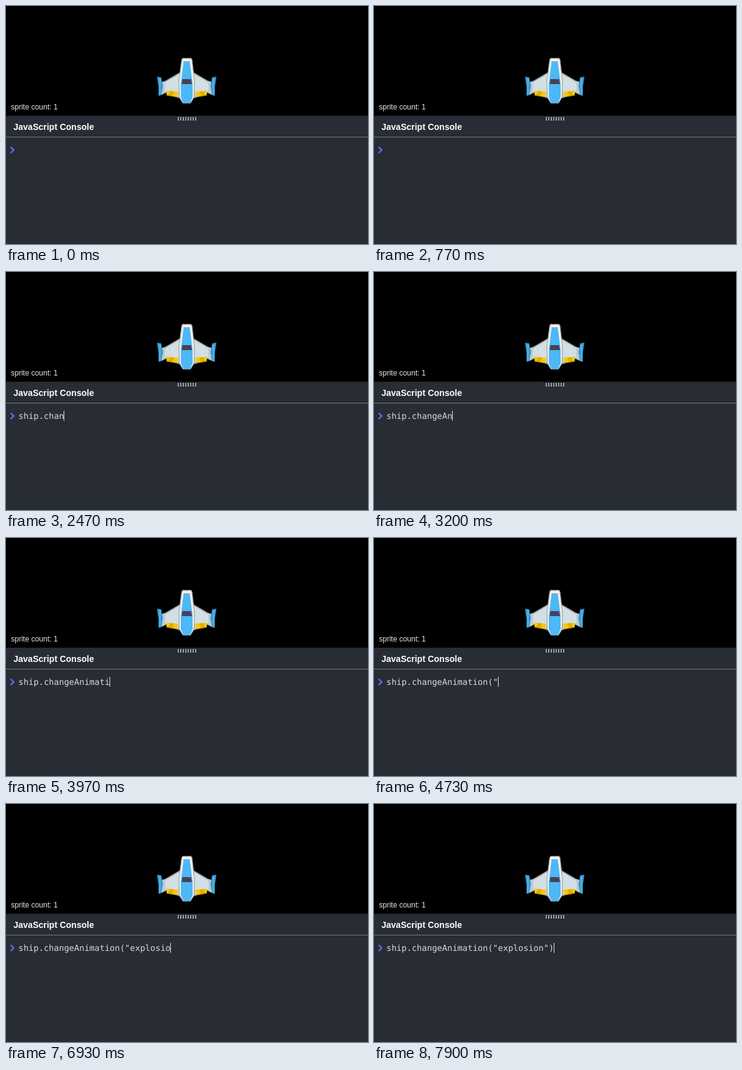
An HTML page that plays this animation: 584 by 384 pixels, repeating every 8000 ms.

```html
<!DOCTYPE html>
<html lang="en">
<head>
<meta charset="utf-8">
<title>JavaScript Console</title>
<style>
  html, body { margin: 0; width: 100%; height: 100%; overflow: hidden; background: #282c34; }
  svg { display: block; width: 584px; height: 384px; }
  .sans { font-family: "Liberation Sans", Arial, sans-serif; }
  #code { font: 13.6px "DejaVu Sans Mono", monospace; fill: #d9d9d9; text-rendering: geometricPrecision; }
</style>
</head>
<body>
<svg viewBox="0 0 584 384">
  <defs>
    <linearGradient id="fin" x1="0" x2="1">
      <stop offset="0" stop-color="#2f80b5"/>
      <stop offset=".5" stop-color="#4ab9f2"/>
      <stop offset="1" stop-color="#2c86c0"/>
    </linearGradient>
    <g id="wing" stroke-linejoin="round">
      <path d="M282 107L258 121L250 124V143L259 139L279 148Z" fill="#d2dfe5" stroke="#9b9d9e" stroke-width="1.5"/>
      <path d="M250 123L258 121.500L256 130L257 139L250 143Z" fill="#bccbd2"/>
      <path d="M259 136.500L278 138.500L276 147L259 143.500Z" fill="#f4c90a"/>
      <path d="M265 137.200L271 138L268 145.500L262 144Z" fill="#e0ad00"/>
      <path d="M259 144L276 147" stroke="#b58e16"/>
      <path d="M244 114.500L250 115.500L252.500 129L250 143.500L246.500 144.500L246.500 130Z" fill="url(#fin)" stroke="#3487b8"/>
    </g>
  </defs>

  <rect width="584" height="177" fill="#000"/>
  <use href="#wing"/>
  <use href="#wing" transform="matrix(-1 0 0 1 583 0)"/>
  <g stroke-linejoin="round">
    <path d="M285 84.500H298.500L300 87L304 121L303.500 147L297.500 156.500H285.500L279.500 147L279 121L283.500 87Z" fill="#f0f2f3" stroke="#a9a5a3" stroke-width="1.3"/>
    <path d="M286.500 90H296.500L301 125V147L296.500 157H286.500L282 147V125Z" fill="#4db8f5"/>
    <path d="M286 89.500H297" stroke="#b9a9a7"/>
    <path d="M284.500 118H298.500L300 126H283.500Z" fill="#4b4056"/>
  </g>
  <text class="sans" x="8" y="167" font-size="12" fill="#e6e6e6">sprite count: 1</text>

  <rect y="177" width="584" height="207" fill="#282c34"/>
  <path d="M277 180.500H308M277 183.500H308" stroke="#d4d5d7" stroke-width="2" stroke-dasharray="2 2"/>
  <text class="sans" x="12" y="200" font-size="14" font-weight="700" fill="#fff">JavaScript Console</text>
  <rect y="211" width="584" height="1" fill="#77797e"/>
  <path d="M7.500 227.500L12.500 232.300L7.500 237.100" fill="none" stroke="#5474e8" stroke-width="2.300"/>
  <text id="code" x="20" y="237"></text>
  <rect id="caret" y="224" width="1" height="16" fill="#e4e4e4"/>
</svg>
<script>
  const LOOP = 8000, LEFT = 20, ADVANCE = 8.187;
  const line = 'ship.changeAnimation("explosion")';

  // When each character of the line is typed, in ms.
  const keys = [
    900, 1030, 1170, 1330, 1630,
    2130, 2230, 2330, 2470, 2630, 2700,
    3000, 3200, 3370, 3570, 3670, 3770, 3900, 4030, 4070,
    4400, 4730,
    5500, 5870, 5950, 6030, 6270, 6600, 6870, 6930, 7270,
    7630, 7900
  ];
  // Spans in which the caret is blinked off.
  const blinks = [[0, 130], [730, 900], [5300, 5500]];

  const code = document.getElementById("code");
  const caret = document.getElementById("caret");

  function draw(t) {
    const typed = keys.filter(k => k <= t).length;
    const hidden = blinks.some(([from, to]) => t >= from && t < to);
    code.textContent = line.slice(0, typed);
    caret.setAttribute("x", Math.floor(LEFT + typed * ADVANCE));
    caret.setAttribute("visibility", hidden ? "hidden" : "visible");
  }

  const start = performance.now();
  function tick() {
    draw((performance.now() - start) % LOOP);
    requestAnimationFrame(tick);
  }
  tick();
</script>
</body>
</html>
```
